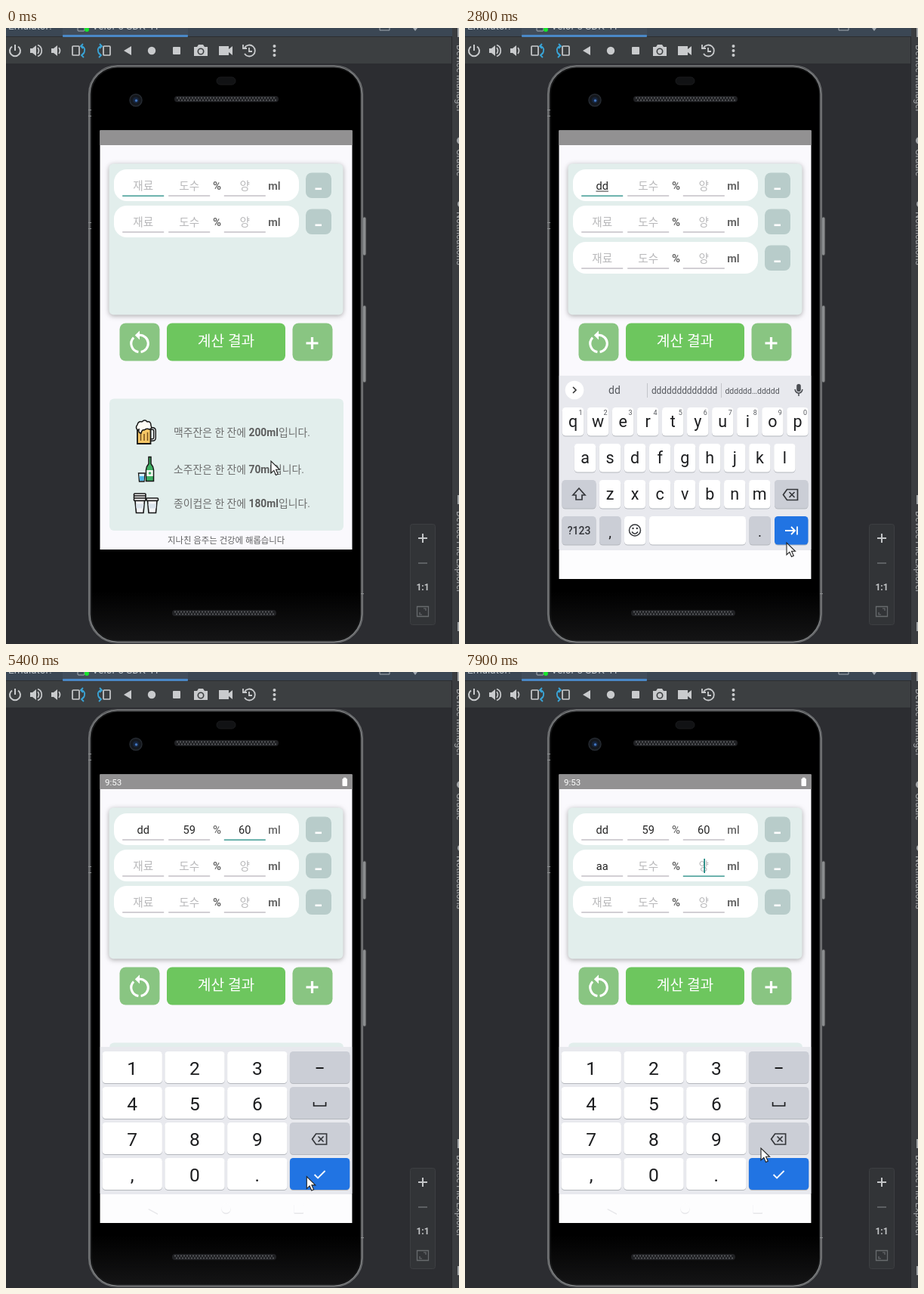
Write an HTML page with a canvas that moves like this. It is 600x815 px and loops after 8000 ms.

```html
<!DOCTYPE html>
<html lang="ko">
<head>
<meta charset="utf-8">
<style>
html, body { margin: 0; width: 100%; height: 100%; overflow: hidden; background: #2c2d31; }
canvas { display: block; }
</style>
</head>
<body>
<canvas id="stage" width="600" height="815"></canvas>
<script>
const c = document.getElementById('stage').getContext('2d');
const FONT = 'Roboto, "Noto Sans CJK KR", "Noto Sans CJK JP", "Noto Sans CJK", sans-serif';
const LOOP = 8000, STEP = 100;
const MINT = '#e2eeec', TEAL = '#18867e', KEY = '#cbced6', BLUE = '#2174e3', INK = '#1d1e20';
const LEFT = 124.5, WIDE = 334;

// Fields 0-8 are numbered by row; focus is a field number.
const EVENTS = [
  [0, {rows: 2, focus: 0, kb: '', status: 0, nav: 0}],
  [200, {kb: 'abc'}], [400, {0: 'd'}], [600, {0: 'dd'}], [900, {kb: ''}],
  [1000, {status: 1, nav: 1}], [1300, {rows: 3, focus: -1}],
  [2200, {focus: 0}], [2300, {kb: 'abc', status: 0, nav: 0}],
  [3000, {focus: 1, kb: 'num'}], [3400, {1: '5'}], [3700, {1: '59', status: 1}],
  [4100, {focus: 2}], [4500, {2: '6'}], [4900, {2: '60'}], [5500, {kb: ''}],
  [6100, {focus: 3}], [6200, {kb: 'abc', status: 0}], [6400, {status: 1}],
  [7100, {3: 'a'}], [7300, {3: 'aa'}], [7500, {focus: 4, kb: 'num'}], [7800, {focus: 5}]
];
const MOUSE = [
  [0, 351, 573], [300, 226, 572], [600, 226, 572], [900, 196, 708], [1200, 405, 416],
  [1500, 166, 174], [1900, 182, 208], [2200, 182, 208], [2800, 426, 681], [3000, 426, 676],
  [3400, 250, 575], [3700, 333, 620], [4100, 415, 665], [4500, 333, 572], [4700, 263, 649],
  [4900, 252, 662], [5500, 410, 668], [6000, 181, 254], [6100, 181, 254], [6800, 407, 617],
  [7100, 160, 570], [7300, 160, 570], [7500, 420, 665], [7700, 416, 663], [7900, 392, 630]
];

function box(x, y, w, h, r, fill, line, lw = 1) {
  c.beginPath();
  c.roundRect(x, y, w, h, r);
  if (fill) { c.fillStyle = fill; c.fill(); }
  if (line) { c.strokeStyle = line; c.lineWidth = lw; c.stroke(); }
}
const dot = (x, y, r, fill, line, lw) => box(x - r, y - r, 2 * r, 2 * r, r, fill, line, lw);

function shape(d, x, y, fill, line, lw = 1) {
  const p = new Path2D(d);
  c.save();
  c.translate(x, y);
  if (fill) { c.fillStyle = fill; c.fill(p); }
  if (line) { c.strokeStyle = line; c.lineWidth = lw; c.stroke(p); }
  c.restore();
}

function text(s, x, y, size, color, align = 'center', weight = 400) {
  c.font = `${weight} ${size}px ${FONT}`;
  c.fillStyle = color;
  c.textAlign = align;
  c.fillText(s, x, y);
  return c.measureText(s).width;
}

function toolbar() {
  const k = '#c9cbcd';
  box(0, 0, 600, 11, 0, '#3b4754');
  box(75, 0, 166, 11, 0, '#414d5b');
  text('Emulator:', 3, 2, 13.5, '#bbc3ca', 'left');
  text('Velor 5 SDK 41', 114, 2, 13.5, '#c5ccd2', 'left');
  box(95, -5, 9, 9, 1, null, '#aab2b8');
  dot(107, 2, 3, '#18e52c');
  box(75, 9, 166, 3, 1, '#4a88c7');
  box(0, 12, 600, 35, 0, '#3c3f41');
  box(495, -6, 13, 9, 0, null, '#a5adb5');
  shape('M-3 0H3L0 4Z', 542, 0, '#a5adb5');
  shape('M0-8V0M-4-5.5A7 7 0 1 0 4-5.5', 12, 30, null, k, 2);
  const horn = 'M-7-3H-4L1-7V7L-4 3H-7Z';
  shape(horn, 39, 30, k);
  shape('M3-4Q6 0 3 4M3-7.5C10-5 10 5 3 7.5', 39, 30, null, k, 1.7);
  shape(horn, 67, 30, k);
  shape('M3-4Q6 0 3 4', 67, 30, null, k, 1.7);
  for (const [x, f] of [[97, 1], [129, -1]]) {
    c.save();
    c.translate(x, 30);
    c.scale(f, 1);
    box(-9, -6, 9, 12, 1, null, k, 1.7);
    shape('M2-6Q8-5 7 0Q7 4 3 6M5-9L2-6L5-3M6 3L3 6L6 9', 0, 0, null, '#39a5d8', 1.8);
    c.restore();
  }
  shape('M-5 0L5-6V6Z', 161, 30, k);
  dot(193, 30, 5.2, k);
  box(221, 25, 10, 10, 1, k);
  shape('M-9-5H-5L-3-8H3L5-5H9V7H-9Z', 258, 30, k);
  dot(258, 31, 3.7, k, '#3c3f41', 1.6);
  shape('M-9-6H4V-2L9-6V6L4 2V6H-9Z', 291, 30, k);
  shape('M-6-4A7.5 7.5 0 1 1-6 4M-8-8V-3H-3M0-4V1H4', 322, 30, null, k, 1.8);
  for (const y of [24, 30, 36]) dot(355.5, y, 2, k);
}

function sidebar() {
  box(591, 0, 9, 815, 0, '#3b3d40');
  box(590, 11, 1, 804, 0, '#28292c');
  for (const [s, y] of [['Device Manager', 22], ['Gradle', 160], ['Notifications', 243], ['Device File Explorer', 639]]) {
    c.save();
    c.translate(597, y);
    c.rotate(Math.PI / 2);
    text(s, 0, 0, 12.5, '#a4a7a9', 'left');
    c.restore();
  }
  for (const y of [0, 618, 786]) box(598, y, 6, 12, 0, '#a4a7a9');
  dot(602, 149, 5, '#a4a7a9');
  dot(602, 233, 4, '#a4a7a9');
  box(535.5, 656.5, 33, 133, 3, '#323437', '#3d3f42');
  shape('M-6 0H6M0-6V6', 552, 675, null, '#c4c6c8', 2);
  shape('M-6 0H6', 552, 708, null, '#5d6063', 2);
  text('1:1', 552, 744, 12, '#c4c6c8', 'center', 700);
  box(544.5, 765.5, 15, 13, 0, null, '#686b6e', 1.3);
  shape('M-4 1V4H-1M4-1V-4H1', 552, 772, null, '#686b6e', 1.2);
}

function grille(x, y) {
  box(x, y, 138, 8, 4, '#202124');
  c.save();
  c.setLineDash([2, 2]);
  shape('M3 2.5H135M5 5.5H135', x, y, null, '#606265', 1.6);
  c.restore();
}

function phone() {
  const shade = c.createLinearGradient(0, 745, 0, 813);
  shade.addColorStop(0, '#000');
  shade.addColorStop(1, '#151516');
  for (const [y, h] of [[250, 51], [367, 102]]) box(472.5, y, 4.5, h, 2, '#8b8d8f', '#3a3b3d');
  box(109.5, 49.5, 363, 764, 38, '#3a3b3d', '#6f7173', 1.2);
  box(111, 51, 360, 761, 36.5, '#1a1b1c', '#8a8c8e', 1.2);
  box(113.5, 53, 355.5, 757, 34.5, shade);
  for (const y of [108, 116, 257, 265]) box(109, y, 4, 1, 0, '#8d8f91');
  box(470, 748, 4, 1, 0, '#8d8f91');
  dot(172, 95.5, 8, '#15181d', '#252a31', 1.5);
  dot(172, 95.5, 4, '#16243b');
  dot(172.5, 96, 1.8, '#4173bd');
  box(279, 65, 25, 10, 5, '#111214', '#1a1b1d');
  grille(223, 90);
  grille(220, 770);
}

function drinks() {
  const ink = '#171717';
  // beer mug
  const handle = 'M20 12H23Q26 12 26 15V24Q26 27 23 27H20';
  shape(handle, 171, 518, null, ink, 4);
  shape(handle, 171, 518, null, '#edf3f6', 1.2);
  shape('M3 10H20.5V32H3Z', 171, 518, '#f6c766', ink, 1.8);
  shape('M7.5 17V28M12 19V28M16.5 17V28', 171, 518, null, '#7a5320', 1.5);
  shape('M3 14Q0 10 3 7Q4 2 9 3Q13-1 16 3Q21 2 21 8Q23 12 19 13Q15 11 12 14Q9 13 8 18Q4 18 5 13Z', 171, 518, '#fffdf5', ink, 1.5);
  // bottle and glass
  shape('M3.5 0H6.5V9Q10 13 10 17V32H0V17Q0 13 3.5 9Z', 185.5, 567.5, '#3daf62', ink, 1.5);
  box(186.3, 585, 8.4, 8, 0, '#f1f6ef');
  dot(190.5, 589, 1.8, '#3daf62');
  shape('M0 0H8.5L7.5 11H1Z', 175.5, 589, '#d9f3ff', ink, 1.3);
  shape('M1 4H7.5L7 10H1.7Z', 175.5, 589, '#51b7e6');
  // paper cups
  for (const [x, y] of [[169.5, 616], [169.5, 619], [169.5, 622], [186, 622]]) box(x, y, 15.5, 3.5, 1, '#fff', ink, 1.6);
  for (const x of [171, 187.5]) {
    shape('M0 0H12.5L11 16H1.5Z', x, 625.5, '#f5f7f9', ink, 1.6);
    shape('M1 4H11.5L11 10H1.5Z', x, 625.5, '#dbe4ec');
  }
}

function app(s, caret) {
  box(LEFT, 135.5, WIDE, 593.5, 0, '#faf9fd');
  box(LEFT, 135.5, WIDE, 19.5, 0, '#929192');
  if (s.status) {
    text('9:53', 131, 149.5, 11.5, '#fff', 'left');
    box(445.5, 141, 6.5, 10, 1, '#fff');
    box(447, 139.7, 3.5, 2, 0, '#fff');
  }
  c.save();
  c.shadowColor = 'rgba(0,0,0,.32)';
  c.shadowBlur = 6;
  c.shadowOffsetY = 1.5;
  box(136.5, 179.5, 310, 200, 6, MINT);
  c.restore();

  for (let r = 0; r < s.rows; r++) {
    const y = 187 + 48 * r;
    box(143, y, 245, 42, 17, '#fff');
    ['재료', '도수', '양'].forEach((hint, i) => {
      const id = r * 3 + i, v = s[id] || '', x = [181.7, 242.7, 316.3][i], on = s.focus === id;
      const w = text(v || hint, x, y + 27, 14.6, v ? '#252525' : '#b9b9bb');
      box(x - 27.5, y + 34.4, 55, on ? 1.3 : 1, 0, on ? TEAL : '#a5a0a9');
      if (on && s.kb === 'abc' && v) box(x - w / 2, y + 28.5, w, 1, 0, '#333');
      if (on && caret) box(x + (v ? w / 2 : 0), y + 12, 1.7, 19, 0, TEAL);
    });
    text('%', 279.5, y + 27, 15, '#686868', 'center', s[r * 3 + 1] ? 500 : 700);
    text('ml', 355.5, y + 27, 14.5, '#686868', 'center', s[r * 3 + 2] ? 500 : 700);
    box(397, y + 4.5, 34, 33.5, 8, '#b8ccca');
    box(409.5, y + 24.5, 8.5, 2.6, 0, '#fff');
  }

  box(150.5, 390.5, 53, 50, 8, '#89c582');
  box(213, 390.5, 157, 50, 7, '#6dc65e');
  box(379.5, 390.5, 53, 50, 8, '#89c582');
  text('계산 결과', 291.5, 420.5, 19.2, '#fff');
  shape('M-7.9-7.9A11.2 11.2 0 0 0-1.6 11.1M1.6 11.1A11.2 11.2 0 0 0 0-11.2', 177, 417.5, null, '#fff', 3.1);
  shape('M0-17V-5L-6.2-11Z', 177, 417.5, '#fff');
  shape('M-8 0H8M0-8V8', 405.5, 417, null, '#fff', 3.2);

  box(137, 490.5, 310, 174.5, 6, MINT);
  drinks();
  [['맥주잔은', '200ml', 539.5], ['소주잔은', '70ml', 588.5], ['종이컵은', '180ml', 633.5]].forEach(([cup, ml, y]) => {
    let x = 222;
    x += text(cup + ' 한 잔에 ', x, y, 13.85, '#6c6d6d', 'left');
    x += text(ml, x, y, 13.85, '#5c5d5d', 'left', 700);
    text('입니다.', x, y, 13.85, '#6c6d6d', 'left');
  });
  text('지나친 음주는 건강에 해롭습니다', 291.7, 682, 11.4, '#606062');
  box(LEFT - 1, 690, WIDE + 2, 40, 0, '#000');
  if (s.nav) navIcons('#fff', 709.7);
}

function navIcons(color, y) {
  shape('M-7 0L6-7V7Z', 195, y, color);
  dot(291.5, y, 6.2, color);
  box(381.5, y - 6.5, 12.5, 12.5, 1, color);
}

function key(x, y, w, h, fill = '#fff') {
  box(x, y + 1, w, h, 4.5, '#b4b7bd');
  box(x, y, w, h, 4.5, fill);
}

const erase = (x, y) => shape('M-10 0L-5-7H9V7H-5ZM-2-3.5L5 3.5M5-3.5L-2 3.5', x, y, null, '#35373b', 1.7);

function letters(s) {
  const v = s[s.focus], g = '#4b4e53';
  box(LEFT, 460, WIDE, 231, 0, '#e8e9ee');
  dot(145, 479, 12.3, '#fff');
  shape(v ? 'M-2-4L2 0L-2 4' : 'M2-4L-2 0L2 4', 145, 479, null, '#333', 1.6);
  if (v) {
    text(v, 198, 484, 14, '#55585d');
    text(v[0].repeat(13), 290.5, 484, 11.9, '#55585d');
    text(v[0].repeat(6) + '…' + v[0].repeat(5), 380.5, 484, 10.5, '#55585d');
    for (const x of [241, 339]) box(x, 470, 1, 19, 0, '#c3c5ca');
  } else {
    dot(188, 477.5, 4.5, null, g, 1.7);
    shape('M3.5 3.5L8 8', 188, 477.5, null, g, 2);
    shape('M-6-6H6V2L2 6H-6ZM6 2H2V6M-3 1Q0 4 2 0M-3-2H-2M2-2H3', 237.5, 479, null, g, 1.5);
    text('GIF', 285.5, 483, 11, g, 'center', 900);
    box(328.5, 473, 11.5, 13, 1, null, g, 1.5);
    shape('M-2-6H2M-3-2H3M-3 1H3M-3 4H1', 334.2, 479, null, g, 1.5);
    box(363, 470, 1, 18, 0, '#d5d7db');
    for (const x of [388, 393.5, 399]) dot(x, 479, 1.6, g);
  }
  box(439.2, 471, 5.6, 10, 2.8, g);
  shape('M-5 0Q-4 5 0 5Q4 5 5 0M0 5V9', 442, 478, null, g, 1.5);

  ['qwertyuiop', 'asdfghjkl', 'zxcvbnm'].forEach((row, r) => {
    [...row].forEach((ch, i) => {
      const x = [143, 159, 192][r] + 33.05 * i, y = 502 + 48 * r;
      key(x - 14.2, y, 28.4, 37.5);
      text(ch, x, y + 26, 21.5, INK);
      if (!r) text((i + 1) % 10, x + 10, y + 10, 9, '#55585d');
    });
  });
  key(128.5, 598, 45, 37.5, KEY);
  shape('M0-8L8 1H4V7H-4V1H-8Z', 151, 617, null, '#35373b', 1.7);
  key(410, 598, 44.5, 37.5, KEY);
  erase(431.5, 617.5);
  key(128.5, 646, 45, 37.5, KEY);
  text('?123', 151, 669.5, 14, '#33353a', 'center', 500);
  key(178, 646, 28.4, 37.5, KEY);
  text(',', 192, 674, 19, INK);
  key(211, 646, 28.4, 37.5);
  dot(225, 664.5, 7.5, null, '#35373b', 1.5);
  shape('M-4 1.5Q0 7 4 1.5', 225, 665, null, '#35373b', 1.5);
  for (const x of [222.5, 227.8]) dot(x, 662, 1.2, '#35373b');
  key(244, 646, 128, 37.5);
  key(376.5, 646, 28.4, 37.5, KEY);
  text('.', 390.5, 673, 19, INK);
  key(410, 646, 44.5, 37.5, BLUE);
  nextArrow(432, 665);
}

const nextArrow = (x, y) => shape('M-8 0H5M0-5L5 0L0 5M8-5.5V5.5', x, y, null, '#fff', 1.8);

function numbers(s) {
  box(LEFT, 496, WIDE, 195, 0, '#e8e9ee');
  [...'123-456 789<,0.>'].forEach((ch, i) => {
    const col = i % 4, x = 127.5 + 82.8 * col, y = 502 + 47 * (i >> 2), mx = x + 39.7;
    key(x, y, 79.4, 42, ch === '>' ? BLUE : col === 3 ? KEY : '#fff');
    if (ch === '-') box(mx - 5, y + 21, 10, 2, 0, INK);
    else if (ch === ' ') shape('M-8-3V2H8V-3', mx, y + 23, null, INK, 1.7);
    else if (ch === '<') erase(mx, y + 22);
    else if (ch !== '>') text(ch, mx, y + 30.5, 24.5, INK);
    else if (s.focus % 3 === 2) shape('M-7 0L-2.5 4.5L7-5', mx, y + 22, null, '#fff', 1.8);
    else nextArrow(mx, y + 22);
  });
}

function keyboard(s, p) {
  c.save();
  c.beginPath();
  c.rect(LEFT, 155, WIDE, 574);
  c.clip();
  box(LEFT, 690, WIDE, 40, 0, '#fdfdfe');
  c.translate(0, (1 - p) * 230);
  s.kb === 'abc' ? letters(s) : numbers(s);
  box(LEFT, 691, WIDE, 39, 0, '#fdfdfe');
  if (s.status) {
    navIcons('#e6e6e9', 711);
    navIcons('#fdfdfe', 709.5);
  }
  c.restore();
}

function pointer(t) {
  const i = MOUSE.findLastIndex(m => m[0] <= t);
  const a = MOUSE[i], b = MOUSE[i + 1] || a;
  const u = (t - a[0]) / (b[0] - a[0] || 1), e = u * u * (3 - 2 * u);
  shape('M0 0V16L3.8 12.4L6.5 18.5L9.3 17.2L6.6 11.3H11.5Z',
    a[1] + (b[1] - a[1]) * e, a[2] + (b[2] - a[2]) * e, '#fff', '#222', 1.1);
}

function draw(t) {
  const s = {};
  let last = 0, opened = 0;
  for (const [at, change] of EVENTS) {
    if (at > t) break;
    if (change.kb && !s.kb) opened = at;
    Object.assign(s, change);
    last = at;
  }
  const caret = s.kb && (t - last) % 1000 < 500;
  box(0, 0, 600, 815, 0, '#2c2d31');
  toolbar();
  sidebar();
  phone();
  app(s, caret);
  if (s.kb) keyboard(s, 1 - (1 - Math.min(1, (t - opened + 100) / 300)) ** 2);
  pointer(t);
}

const start = performance.now();
function frame() {
  const t = (performance.now() - start) % LOOP;
  draw(Math.floor(t / STEP) * STEP);
  requestAnimationFrame(frame);
}
frame();
</script>
</body>
</html>
```
